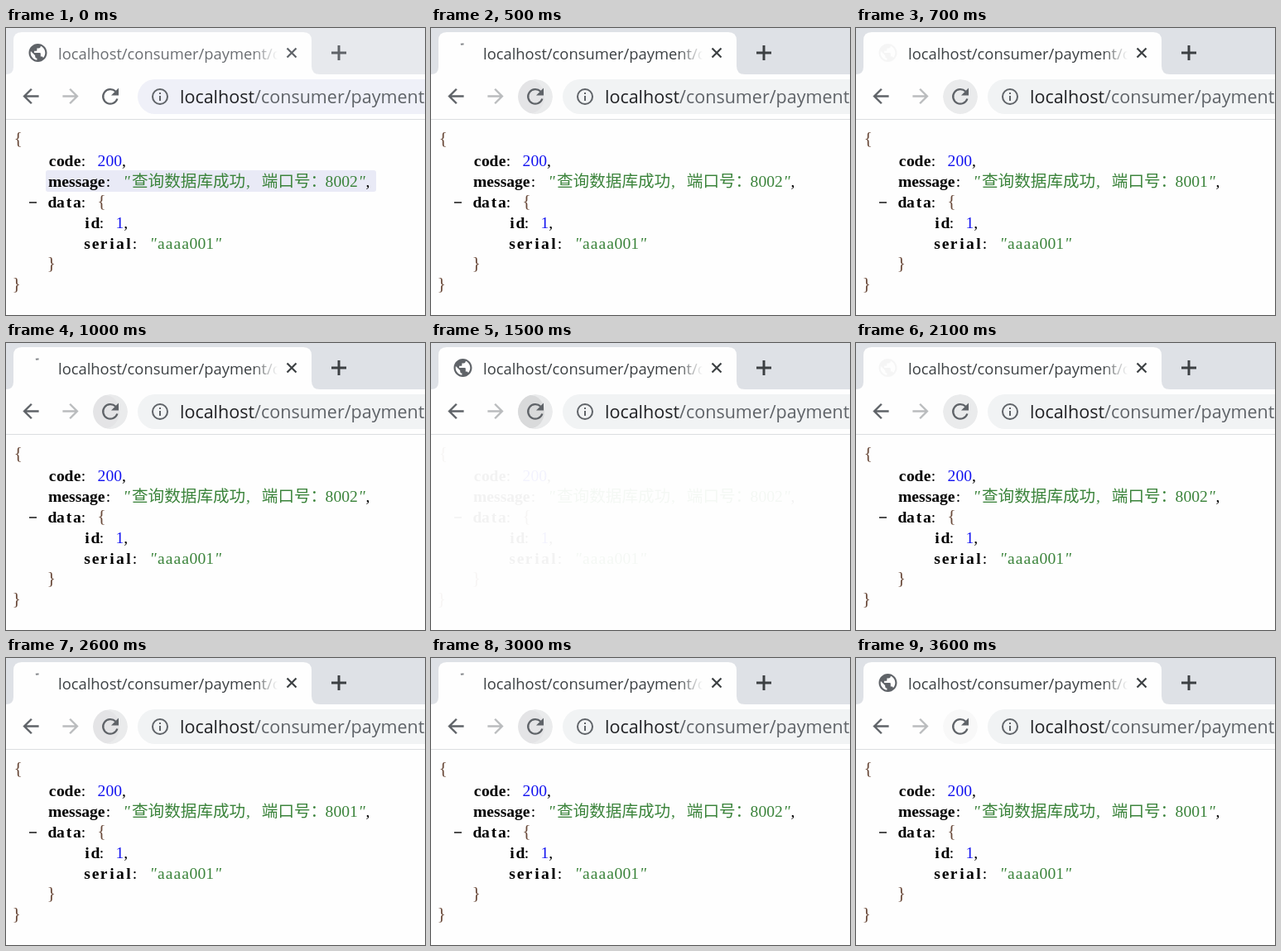
An HTML page that plays this animation: 506 px wide and 347 px high, repeating every 3.8 s.

```html
<!DOCTYPE html>
<html lang="zh">
<head>
<meta charset="utf-8">
<style>
  html, body { margin: 0; width: 100%; height: 100%; overflow: hidden; background: #fefefe; }
  svg { display: block; width: 506px; height: 347px; }
  .ui { font-family: "Open Sans", "Noto Sans", sans-serif; }
  .json { font: 19.6px "Liberation Serif", "Noto Sans CJK SC", "Noto Sans CJK", serif; white-space: pre; }
  .key { font-weight: 700; fill: #000; }
  .num { fill: #1414f0; }
  .str { fill: #3a833a; }
  .cjk { font-family: "Noto Sans CJK SC", "Noto Sans CJK", sans-serif; font-weight: 300; transform: translateX(1.6px); }
  .quote { font-style: italic; }
  .mark { transform: translateX(-2.5px); }
  .brace { fill: #6a4a3a; font-size: 22px; transform: translateY(-1.2px); }
</style>
</head>
<body>
<svg viewBox="0 0 506 347">
  <defs>
    <linearGradient id="fade" gradientUnits="userSpaceOnUse" x1="298" x2="328" y1="0" y2="0">
      <stop stop-color="#fff"/><stop offset="1" stop-color="#000"/>
    </linearGradient>
    <mask id="titleMask" maskUnits="userSpaceOnUse" x="60" y="15" width="268" height="35">
      <rect x="60" y="15" width="268" height="35" fill="url(#fade)"/>
    </mask>
    <clipPath id="buttonClip"><circle cx="126" cy="83" r="21"/></clipPath>
  </defs>

  <rect width="506" height="347" fill="#fefefe"/>
  <rect id="strip" width="506" height="56"/>
  <path d="M0 56Q9 56 9 47V15Q9 5 19 5H359Q369 5 369 15V46Q369 56 379 56Z" fill="#fefefe"/>
  <path d="M0 110.5H506" stroke="#dcdee0"/>

  <g id="globe"></g>
  <path id="spinner" fill="none" stroke="#85888c" stroke-width="2"/>
  <g id="title" class="ui">
    <text x="63" y="38.2" font-size="18.35" mask="url(#titleMask)">localhost/consumer/payment/c</text>
  </g>
  <g id="signs" fill="none">
    <path d="M339.5 24.5l11 11m0-11l-11 11" stroke-width="2.2"/>
    <path d="M393 30h18m-9-9v18" stroke-width="3"/>
  </g>

  <g id="hover" clip-path="url(#buttonClip)">
    <circle cx="126" cy="83" r="21" fill="#eaebec"/>
    <ellipse id="ripple" cx="120" cy="83" rx="17" ry="20" fill="#d9dadb"/>
  </g>
  <g id="tools"></g>
  <rect id="pill" x="159" y="62" width="380" height="42" rx="21"/>
  <g id="info"></g>
  <text class="ui" x="210" y="91.2" font-size="21.5" fill="#202124">localhost<tspan fill="#5f6368">/consumer/payment/</tspan></text>

  <rect id="highlight" x="48" y="172" width="399" height="26" rx="3" fill="#e9eaf6"/>
  <g id="page" class="json"></g>
  <g id="raw" class="json"></g>
</svg>
<script>
const $ = id => document.getElementById(id);
const LOOP = 3800, STEP = 100, CELL = 9.8, GREY = '#5f6368';

const icon = (d, x, y, scale, fill = GREY) =>
  `<path d="${d}" fill="${fill}" transform="translate(${x} ${y}) scale(${scale}) translate(-12 -12)"/>`;

const BACK = 'M20 11H7.83l5.59-5.59L12 4l-8 8 8 8 1.41-1.41L7.83 13H20v-2z';
const FORWARD = 'M4 11H16.17l-5.59-5.59L12 4l8 8-8 8-1.41-1.41L16.17 13H4v-2z';
const GLOBE = 'M12 2C6.48 2 2 6.48 2 12s4.48 10 10 10 10-4.48 10-10S17.52 2 12 2zm-1 17.93c-3.95-.49-7-3.85-7-7.93 0-.62.08-1.21.21-1.79L9 15v1c0 1.1.9 2 2 2v1.93zm6.9-2.54c-.26-.81-1-1.39-1.9-1.39h-1v-3c0-.55-.45-1-1-1H8v-2h2c.55 0 1-.45 1-1V7h2c1.1 0 2-.9 2-2v-.41c2.93 1.19 5 4.06 5 7.41 0 2.08-.8 3.97-2.1 5.39z';

$('tools').innerHTML = icon(BACK, 30, 82.5, 1.2) + icon(FORWARD, 78, 82.5, 1.2, '#babcbe') +
  `<path d="M134.4 85.5A8.8 8.8 0 1 1 132.4 76.8" fill="none" stroke="${GREY}" stroke-width="2.3"/>
   <path d="M136 72.5V81.5H127Z" fill="${GREY}"/>`;
$('globe').innerHTML = icon(GLOBE, 38.5, 30, 1.1);
$('info').innerHTML = `<circle cx="186" cy="83" r="9" fill="none" stroke="${GREY}" stroke-width="2"/>
  <path d="M186 82v6M186 78v2" stroke="${GREY}" stroke-width="2"/>`;

// Text on a monospace grid; wide letters keep their natural advance.
function cells(text, x, line, cls, width, id = '') {
  const y = 141.3 + 25.2 * line;
  const natural = text.includes('m');
  const xs = natural ? x : [...text].map((c, i) => (x + (i + .5) * width).toFixed(1)).join(' ');
  return `<text ${id && `id="${id}"`} class="${cls}" x="${xs}" y="${y.toFixed(1)}" text-anchor="${natural ? 'start' : 'middle'}">${text}</text>`;
}

function row(x, line, ...parts) {
  return parts.map(([text, cls, id]) => {
    const width = cls.includes('cjk') ? CELL * 2 : cls === 'key' ? CELL + .2 : CELL;
    const out = cells(text, x, line, cls, width, id);
    x += text.length * width;
    return out;
  }).join('');
}

const quote = ['"', 'str quote'], colon = [': ', 'mark'], comma = [',', 'mark'];
$('page').innerHTML =
  row(10, 0, ['{', 'brace']) +
  row(51, 1, ['code', 'key'], colon, ['200', 'num'], comma) +
  row(51, 2, ['message', 'key'], colon, quote, ['查询数据库成功', 'str cjk'], [', ', 'str'],
    ['端口号：', 'str cjk'], ['8002', 'str', 'port'], quote, comma) +
  '<path d="M28 211h9" stroke="#222" stroke-width="1.6"/>' +
  row(51, 3, ['data', 'key'], colon, ['{', 'brace']) +
  row(93, 4, ['id', 'key'], colon, ['1', 'num'], comma) +
  row(93, 5, ['serial', 'key'], colon, quote, ['aaaa001', 'str'], quote) +
  row(50, 6, ['}', 'brace']) +
  row(8, 7, ['}', 'brace']);

// The unformatted reply, seen for a moment while the page reloads.
$('raw').innerHTML = row(10, 0, ['{"code":200,"', ''], ['message', ''], ['":"', ''],
  ['查询数据库成功', 'cjk'], [', ', ''], ['端口号：', 'cjk'], ['8001', '']);

// start, port, tab icon, page opacity
const states = [
  [0, 8002, 'globe', 1],
  [500, 8002, 'spin', 1],
  [600, 8002, 'spin', 0],
  [700, 8001, 'faint', 1],
  [800, 8001, 'globe', 1],
  [900, 8002, 'faint', 1],
  [1000, 8002, 'spin', 1],
  [1500, 8002, 'globe', .05],
  [1600, 8001, 'globe', 1],
  [1700, 8001, 'spin', 1],
  [2000, 8002, 'spin', 1],
  [2100, 8002, 'faint', 1],
  [2200, 8002, 'globe', 1],
  [2300, 8001, 'spin', 1],
  [2400, 8001, 'globe', 1],
  [2600, 8001, 'spin', 1],
  [2700, 8002, 'faint', 1],
  [2800, 8002, 'globe', 1],
  [3000, 8002, 'spin', 1],
  [3100, 8001, 'spin', 1],
  [3200, 8001, 'faint', 1],
  [3300, 8001, 'globe', 1]
];

function arc(age) {
  const angle = .35 + age / 100 * .7, r = 10.5;
  const x = a => (38.5 + r * Math.sin(a)).toFixed(2);
  const y = a => (30 - r * Math.cos(a)).toFixed(2);
  return `M${x(.1)} ${y(.1)}A${r} ${r} 0 ${angle > Math.PI ? 1 : 0} 0 ${x(.1 - angle)} ${y(.1 - angle)}`;
}

const show = (id, on) => $(id).setAttribute('opacity', +on);

function draw(time) {
  const t = Math.floor(time % LOOP / STEP) * STEP;
  const [start, port, tab, opacity] = states.filter(s => s[0] <= t).pop();
  const focused = t >= 500;

  $('strip').setAttribute('fill', focused ? '#dee1e6' : '#e7e9ed');
  $('title').setAttribute('fill', focused ? '#3c4043' : '#6b6e72');
  $('signs').setAttribute('stroke', focused ? '#3c4043' : GREY);
  $('pill').setAttribute('fill', focused ? '#f1f3f4' : '#eff0f8');
  show('highlight', !focused);

  show('hover', !focused ? 0 : t >= 3600 ? .3 : 1);
  show('ripple', t === 1500 ? 1 : tab === 'spin' ? .4 : 0);

  show('globe', { globe: 1, faint: .05, spin: 0 }[tab]);
  show('spinner', tab === 'spin');
  $('spinner').setAttribute('d', arc(t - start));

  show('page', opacity);
  show('raw', opacity === 0);
  $('port').textContent = port;
}

const began = performance.now();
function tick() {
  draw(performance.now() - began);
  requestAnimationFrame(tick);
}
tick();
</script>
</body>
</html>
```
